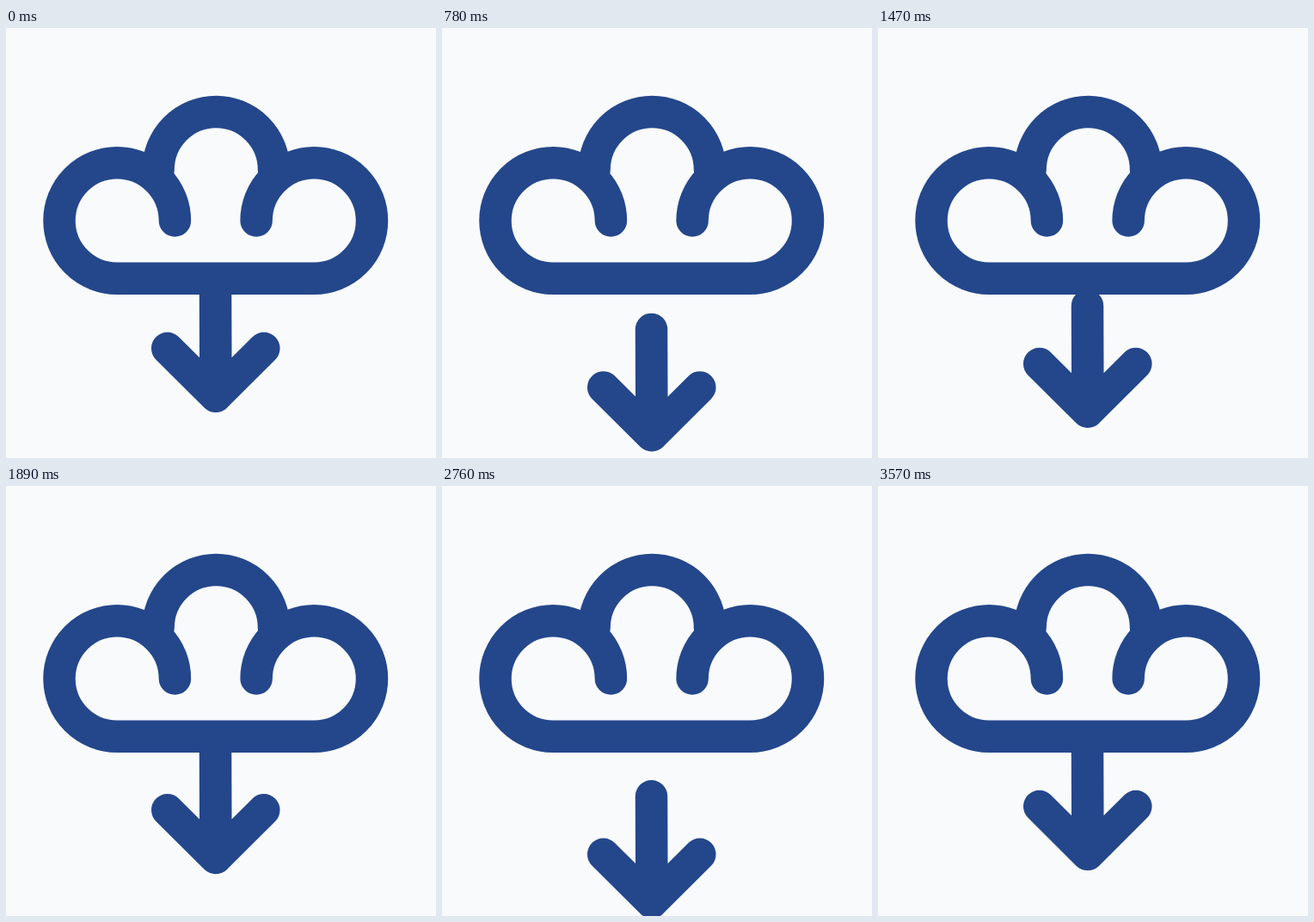
Write an HTML page with a canvas that moves like this. It is 500x500 px and loops after 3630 ms.

```html
<!DOCTYPE html>
<html lang="en">
<head>
<meta charset="utf-8">
<title>Cloud download</title>
<style>
  html, body { margin: 0; width: 100%; height: 100%; overflow: hidden; background: #f8fafc; }
  canvas { display: block; width: 500px; height: 500px; }
</style>
</head>
<body>
<canvas id="stage" width="500" height="500"></canvas>
<script>
const ctx = document.getElementById("stage").getContext("2d");
const LOOP = 3630, STEP = 30, LAST_STEP = 119;
const LEG = 30; // steps between two turning points
const TURNS = [0, 52.4, -2, 59.9, -2]; // arrow offset at each turn

function arrowOffset(step) {
  const leg = Math.floor(step / LEG);
  const part = step / LEG - leg;
  return TURNS[leg] + (TURNS[leg + 1] - TURNS[leg]) * part;
}

function drawCloud() {
  const r = 67.2, left = 129.2, right = 358.3, y = 224;
  ctx.beginPath();
  ctx.arc(left, y, r, 0, Math.PI / 2, true);
  ctx.lineTo(right, y + r);
  ctx.arc(right, y, r, Math.PI / 2, Math.PI, true);
  ctx.stroke();

  ctx.beginPath();
  ctx.arc(244.3, 164.7, r, Math.PI, 0);
  ctx.stroke();
}

function drawArrow(dy) {
  ctx.beginPath();
  ctx.moveTo(243.5, 305 + dy);
  ctx.lineTo(243.9, 428.3 + dy);
  ctx.moveTo(187.7, 372.5 + dy);
  ctx.lineTo(243.8, 428.3 + dy);
  ctx.lineTo(299.8, 372.5 + dy);
  ctx.stroke();
}

function render(now) {
  const step = Math.min(Math.floor((now % LOOP) / STEP), LAST_STEP);
  ctx.fillStyle = "#f8fafc";
  ctx.fillRect(0, 0, 500, 500);
  ctx.strokeStyle = "#24478b";
  ctx.lineWidth = 37.5;
  ctx.lineCap = ctx.lineJoin = "round";
  drawCloud();
  drawArrow(arrowOffset(step));
}

let start;
function tick(now) {
  start ??= now;
  render(now - start);
  requestAnimationFrame(tick);
}
render(0);
requestAnimationFrame(tick);
</script>
</body>
</html>
```
